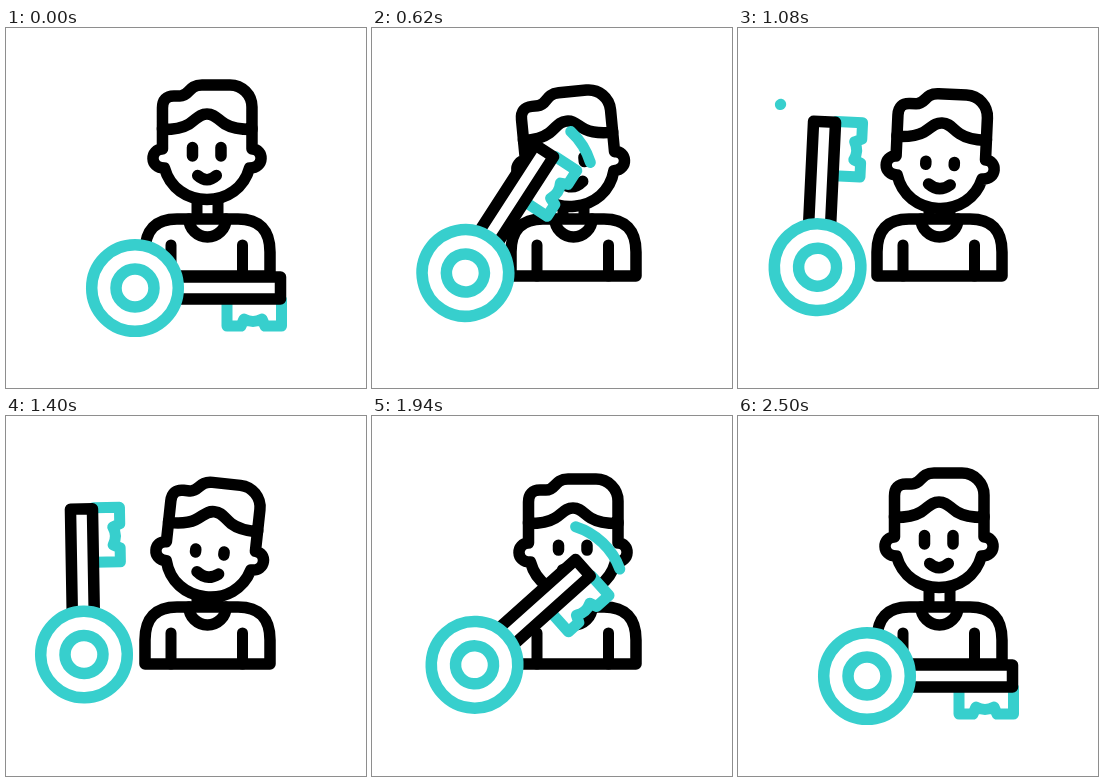
Animation, 360 px wide and 360 px high, one loop 3600 ms. Source, as an HTML page with a canvas:

```html
<!DOCTYPE html>
<html lang="en">
<head>
<meta charset="utf-8">
<title>Key and person</title>
<style>
html, body { margin: 0; width: 100%; height: 100%; overflow: hidden; background: #fff; }
canvas { display: block; width: 100vmin; height: 100vmin; }
</style>
</head>
<body>
<canvas id="stage" width="360" height="360"></canvas>
<script>
const ctx = document.getElementById('stage').getContext('2d');
const LOOP = 3600;
const ACTIVE = 2500;
const BEAT = 830;
const TURN = 1400;
const INK = '#000', TEAL = '#37cfcd', PAPER = '#fff';
const RAD = Math.PI / 180;

const progress = (t, from, to) => Math.min(1, Math.max(0, (t - from) / (to - from)));

function ease(t, from, to) {
  const u = progress(t, from, to);
  return u * u * (3 - 2 * u);
}

// 0 with the key lying down, 1 with the key upright
function lift(t, delay = 0) {
  if (t < TURN) return 1 - (1 - progress(t, 280 + delay, 1880 + delay)) ** 5;
  return 1 - progress(t, TURN, 2180) ** 2;
}

function keyAngle(t) {
  const k = lift(t, 20);
  const dip = 6 * ease(t, 0, 240) * (1 - ease(t, 2220, ACTIVE));
  return dip - 87 * k - 10 * k * k;
}

function headBob(t) {
  if (t >= ACTIVE) return 0;
  const height = t < 2 * BEAT ? 13.5 : 8;
  return height * Math.sin(Math.PI * t / BEAT) ** 2;
}

const headTilt = t => t < 1900 ? -6.2 * Math.sin(2 * Math.PI * t / 1900) : 0;

function draw(path, color, fill, width = 11.5) {
  ctx.lineWidth = width;
  ctx.strokeStyle = color;
  if (fill) {
    ctx.fillStyle = fill;
    ctx.fill(path);
  }
  ctx.stroke(path);
}

function ring(r) {
  const p = new Path2D();
  p.arc(0, 0, r, 0, 2 * Math.PI);
  return p;
}

const neck = new Path2D('M191 165V190M212 165V190');
const body = new Path2D('M139 248V224Q139 191 171 191H232Q264 191 264 224V248Z');
const sleeves = new Path2D('M165 217V248M236.5 217V248');
const collar = new Path2D('M183 191A18.500 18 0 0 0 220 191');
const face = new Path2D('M156.500 100V121C144 121 143 140 158.500 140' +
  'C164 160 181 171.500 201 171.500C221 171.500 238 160 243.500 140C259 140 258 121 246 121V100');
const hair = new Path2D('M156.500 101.500V80Q156.500 68 168 68H174C184 68 182 57 196 57' +
  'H224A22 22 0 0 1 246 79V101.500Q228 101.500 219 96C211 91 209 86 201 86' +
  'C193 86 191 91 183 96Q174 101.500 156.500 101.500Z');
const shaft = new Path2D('M30 -11H145.500V11H30Z');
const tooth = new Path2D('M92 12V38H106L109 31Q118 36 127 31L130 38H146.500V12');
const outer = ring(43.3), inner = ring(19);

function drawBody() {
  draw(neck, INK, null, 11);
  draw(body, INK, PAPER);
  draw(sleeves, INK, null, 11);
  draw(collar, INK);
}

// the eyes squash and the smile widens as the head dips
function drawFeatures(dip) {
  const top = 119.5 + .6 * dip, wide = 9.3 + .17 * dip;
  draw(new Path2D(`M186.5 ${top}V128M215 ${top}V128`), INK);
  draw(new Path2D(`M${201 - wide} 147.500Q201 156 ${201 + wide} 147.500`), INK);
}

function drawHead(t) {
  const dip = headBob(t);
  ctx.save();
  ctx.translate(201, 155 + dip);
  ctx.rotate(headTilt(t) * RAD);
  ctx.translate(-201, -155);
  draw(face, INK, PAPER);
  draw(hair, INK, PAPER);
  drawFeatures(dip);
  ctx.restore();
}

function drawTrail(t) {
  const rising = t < TURN;
  const head = rising ? ease(t, 420, 900) : ease(t, 1490, 2146);
  const tail = rising ? ease(t, 640, 1100) : ease(t, 1820, 2380);
  if (head - tail < .0001) return;
  const side = rising ? -1 : 1;
  const at = u => side * (80 * u - 40) * RAD;
  const p = new Path2D();
  p.arc(107, 0, 70, at(tail), at(head), rising);
  draw(p, TEAL, null, 11);
}

function drawKey(t) {
  const k = lift(t);
  ctx.save();
  ctx.translate(129 - 51 * k, 260 - 21.5 * k);
  ctx.rotate(keyAngle(t) * RAD);
  drawTrail(t);
  draw(tooth, TEAL, PAPER, 11);
  draw(shaft, INK, PAPER);
  draw(outer, TEAL, PAPER);
  draw(inner, TEAL, PAPER);
  ctx.restore();
}

const start = performance.now();

function frame() {
  const t = (performance.now() - start) % LOOP;
  ctx.fillStyle = PAPER;
  ctx.fillRect(0, 0, 360, 360);
  ctx.lineCap = ctx.lineJoin = 'round';
  drawBody();
  drawHead(t);
  drawKey(t);
  requestAnimationFrame(frame);
}
frame();
</script>
</body>
</html>
```
